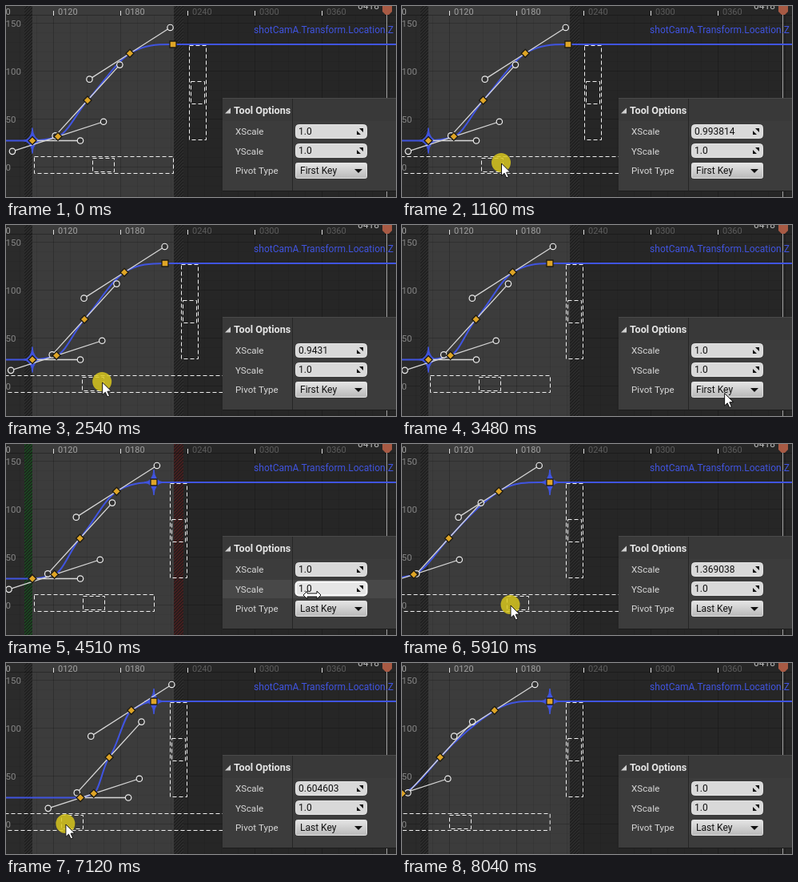
An HTML page with a canvas that plays this animation: 488x239 px, repeating every 8520 ms.

```html
<!DOCTYPE html>
<html>
<head>
<meta charset="utf-8">
<style>
html, body { margin: 0; width: 100%; height: 100%; overflow: hidden; background: #262626; }
canvas { display: block; }
</style>
</head>
<body>
<canvas id="stage" width="488" height="239"></canvas>
<script>
const W = 488, H = 239, LOOP = 8520;
const g = document.getElementById('stage').getContext('2d');
const BLUE = '#4054e0', FONT = 'Roboto, sans-serif';
const ARM = 60; // length of a tangent handle

const KEYS = [[33, 168.5, 0], [65, 163.3, -0.325], [102, 118, -1.1], [155, 59.3, -0.64], [209, 48, 0]]
  .map(([x, y, slope]) => ({ x, y, slope }));

// Each swing: start, end, scale reached
const DRAGS = [
  { press: 880, release: 3080, x: 125, y: 197, rate: 0.0132, grip: -12,
    swings: [[1100, 1880, 0.632673], [2010, 2600, 0.952346], [2760, 3040, 0.8636]] },
  { press: 5150, release: 7820, x: 106.5, y: 202, rate: 0.0125, grip: 8.5,
    swings: [[5200, 6300, 1.518292], [6440, 7240, 0.545506], [7340, 7780, 1.485]] }
];
const COMBO_OPEN = 3860, COMBO_PICK = 4190, POINTER_IN = 230, POINTER_OUT = 8030;

// The pointer travels between places and follows the scale while dragging
const follow = d => d.swings.map(([a, b, s]) => [a, b, [d.x + (s - 1) / d.rate, d.y]]);
const LEGS = [
  [POINTER_IN, 860, [DRAGS[0].x, DRAGS[0].y]],
  ...follow(DRAGS[0]),
  [3080, 3610, [455, 213]],
  [3880, 4130, [400, 230]],
  [4230, 4480, [383, 189]],
  [4710, 5130, [DRAGS[1].x, DRAGS[1].y]],
  ...follow(DRAGS[1]),
  [7820, POINTER_OUT, [175, 245]]
];

function glide(value, legs, t) {
  for (const [a, b, goal] of legs) {
    const u = Math.min(1, Math.max(0, (t - a) / (b - a)));
    value += (goal - value) * u * u * (3 - 2 * u);
  }
  return value;
}
const glideAxis = (from, axis, t) => glide(from, LEGS.map(([a, b, p]) => [a, b, p[axis]]), t);

function rect(x, y, w, h, fill) {
  g.fillStyle = fill;
  g.fillRect(x, y, w, h);
}
function shape(path, x, y, fill, stroke, width = 1) {
  g.save();
  g.translate(x, y);
  const p = new Path2D(path);
  g.fillStyle = fill;
  g.fill(p);
  if (stroke) {
    g.strokeStyle = stroke;
    g.lineWidth = width;
    g.stroke(p);
  }
  g.restore();
}
function line(x1, y1, x2, y2, color, width = 1) {
  g.strokeStyle = color;
  g.lineWidth = width;
  g.beginPath();
  g.moveTo(x1, y1);
  g.lineTo(x2, y2);
  g.stroke();
}
function disc(x, y, r, fill) {
  g.beginPath();
  g.arc(x, y, r, 0, 7);
  g.fillStyle = fill;
  g.fill();
}
function text(s, x, y, color, size = 12, weight = 400, align = 'left') {
  g.font = `${weight} ${size}px ${FONT}`;
  g.textAlign = align;
  g.fillStyle = color;
  g.fillText(s, x, y);
}
function roundBox(x, y, w, h, r, fill, stroke, width = 1) {
  g.beginPath();
  g.roundRect(x, y, w, h, r);
  g.fillStyle = fill;
  g.fill();
  g.strokeStyle = stroke;
  g.lineWidth = width;
  g.stroke();
}
function dashed(x, y, w, h) {
  g.setLineDash([5, 3]);
  g.strokeStyle = '#f0f0f0';
  g.lineWidth = 1;
  g.strokeRect(Math.round(x) + 0.5, y + 0.5, w, h);
  g.setLineDash([]);
}

function hatch(x, w, fill) {
  rect(x, 0, w, H, fill);
  g.save();
  g.beginPath();
  g.rect(x, 0, w, H);
  g.clip();
  for (let y = -w; y < H; y += 4) line(x, y + w, x + w, y, '#1c1c1c', 1.2);
  g.restore();
}

function backdrop(tinted) {
  rect(0, 0, W, H, '#262626');
  rect(0, 0, 23, H, '#2b2b2b');
  rect(33, 0, 177, H, '#3c3c3c');
  for (let x = 17.5; x < W; x += 21) {
    line(x, 12, x, H, `rgba(0,0,0,${(x - 59.5) % 84 ? 0.07 : 0.2})`);
  }
  for (let i = 0; i < 20; i++) {
    const y = 21.5 + i * 12;
    line(0, y, W, y, `rgba(0,0,0,${i % 5 ? 0.05 : 0.2})`);
  }
  hatch(23, 10, tinted ? '#1c4a22' : '#2e2e2e');
  hatch(210, 12, tinted ? '#4a2020' : '#2e2e2e');
  line(0, 11.5, W, 11.5, 'rgba(0,0,0,.3)');
  for (let i = -1; i < 5; i++) {
    const x = 59.5 + i * 84;
    line(x, 6, x, 12, '#e0e0e0');
    text(String(120 + i * 60).padStart(4, '0'), x + 5.5, 11, i < 2 ? '#a0a0a0' : '#5c5c5c', 11);
  }
  for (let i = 0; i < 4; i++) text(150 - i * 50, -0.5, 25.5 + i * 60, '#868686', 11.5);
  text('0418', 440, 4, '#b8b8b8');
  line(476.5, 10, 476.5, H, '#a0a0a0');
  shape('M-6 0H6V7L2 11H-2L-6 7Z', 477, 0, '#a85a44');
  text('shotCamA.Transform.Location.Z', 485, 34, BLUE, 12, 400, 'right');
}

function curve(keys, pivot) {
  g.beginPath();
  g.moveTo(0, keys[0].y);
  g.lineTo(keys[0].x, keys[0].y);
  for (let i = 1; i < keys.length; i++) {
    const a = keys[i - 1], b = keys[i], d = (b.x - a.x) / 3;
    g.bezierCurveTo(a.x + d, a.y + a.slope * d, b.x - d, b.y - b.slope * d, b.x, b.y);
  }
  g.lineTo(W, keys[4].y);
  g.strokeStyle = BLUE;
  g.lineWidth = 2;
  g.stroke();
  shape('M0-16Q1-1 12 0Q1 1 0 16Q-1 1-12 0Q-1-1 0-16Z', pivot.x, pivot.y, BLUE, BLUE);

  keys.forEach(({ x, y, slope }, i) => {
    const sides = x < 0 || i === 4 ? [] : i ? [-1, 1] : [1];
    for (const side of sides) {
      const dx = side * ARM / Math.hypot(1, slope), hx = x + dx, hy = y + dx * slope;
      line(x, y, hx, hy, '#d8d8d8', 1.3);
      disc(hx, hy, 4.3, '#eee');
      disc(hx, hy, 3.1, '#333');
    }
  });
  keys.forEach(({ x, y }, i) => {
    const outline = i === 4 ? 'M-4-4H4V4H-4Z' : 'M0-5L5 0L0 5L-5 0Z';
    shape(outline, x, y, '#dfa526', '#1c1a14', 1.3);
  });
}

function field(y, value, hover) {
  roundBox(362.5, y + 0.5, 89, 17, 4, hover ? '#e6e6e6' : '#d9d9d9', hover ? '#fff' : '#e4e4e4', hover ? 2 : 1);
  text(value, 366, y + 13, '#111');
  shape('M3 0H8V5ZM0 3V8H5Z', 439, y + 5, '#111');
}

function panel(scale, choice, hoverY, open) {
  rect(271, 115, 217, 117, '#3c3c3c');
  rect(271, 115, 217, 29, '#393939');
  if (hoverY) rect(271, 170, 217, 23, '#484848');
  line(271, 115.5, W, 115.5, '#4a4a4a');
  line(271, 231.5, W, 231.5, '#1c1c1c');
  line(358.5, 116, 358.5, 231, '#262626');
  shape('M7 0V7H0Z', 274, 127.5, '#d0d0d0');
  text('Tool Options', 285, 135, '#e6e6e6', 12.6, 700);
  ['XScale', 'YScale', 'Pivot Type'].forEach((s, i) => text(s, 287, 161 + i * 24.5, '#d8d8d8', 11.6));
  field(148, scale);
  field(172, '1.0', hoverY);
  const shade = g.createLinearGradient(0, 196, 0, 216);
  shade.addColorStop(0, '#e6e6e6');
  shade.addColorStop(1, '#b8b8b8');
  roundBox(362.5, 196.5, 89, 19, 2, shade, '#e2e2e2');
  text(choice, 368, 210, '#111');
  shape('M-5 0H5L0 5Z', 441, 204, '#111');
  if (open) {
    rect(362, 217, 90, 22, '#3a3a3a');
    text('First Key', 368, 230, '#ddd');
    rect(363, 236, 88, 3, '#b87a1c');
  }
}

function pointer(x, y, pressed, resize) {
  if (pressed) disc(x - 0.5, y - 1, 12, 'rgba(218,200,30,.84)');
  const outline = resize
    ? 'M-11 0L-6-5V-2H6V-5L11 0L6 5V2H-6V5Z'
    : 'M0 0V15.5L3.6 12.2L6.2 18L8.8 16.8L6.2 11.2L11 11Z';
  shape(outline, x, y, '#fff', '#111');
}

function draw(t) {
  const scales = DRAGS.map(d => glide(1, d.swings, t));
  const index = DRAGS.findIndex(d => t >= d.press && t < d.release);
  const drag = DRAGS[index];
  const end = KEYS[0].x + (KEYS[4].x - KEYS[0].x) * scales[0];
  const keys = KEYS.map(k => {
    const x = KEYS[0].x + (k.x - KEYS[0].x) * scales[0];
    return { ...k, x: end + (x - end) * scales[1] };
  });
  const first = keys[0], last = keys[4], picked = t >= COMBO_PICK;
  const px = glideAxis(190, 0, t), py = glideAxis(242, 1, t);
  const hoverY = px > 362 && px < 452 && py > 172 && py < 191;

  backdrop(hoverY);
  curve(keys, picked ? last : first);

  dashed(last.x + 20, 49, 21, 118);
  dashed(last.x + 22, 94, 17, 28);
  const left = drag ? -10 : first.x + 2, right = drag ? W : last.x;
  dashed(left, 188, right - left, 21);
  const mid = drag ? px + drag.grip : (first.x + last.x) / 2 + 1;
  dashed(mid - 14, 190, 27, 17);

  const moved = drag && t > drag.swings[0][0];
  const value = moved ? String(+scales[index].toFixed(6)) : '1.0';
  panel(value, picked ? 'Last Key' : 'First Key', hoverY, t >= COMBO_OPEN && !picked);

  const click = [COMBO_OPEN, COMBO_PICK].some(c => Math.abs(t - c) < 40);
  if (t >= POINTER_IN && t < POINTER_OUT) pointer(px, py, drag || click, hoverY);
}

const start = performance.now();
function frame() {
  const t = (performance.now() - start) % LOOP;
  draw(Math.floor(t / 10) * 10);
  requestAnimationFrame(frame);
}
frame();
</script>
</body>
</html>
```
